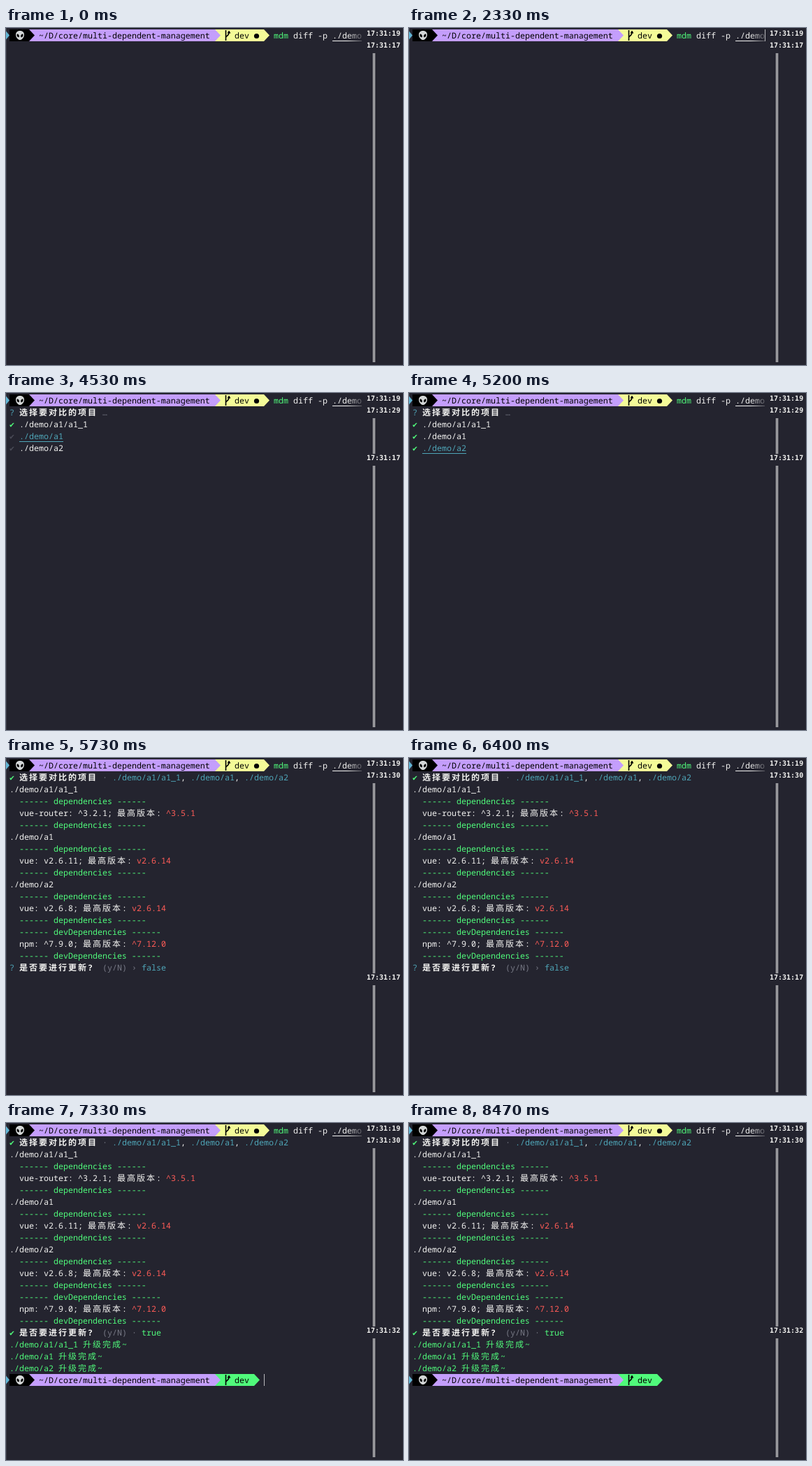
Write an HTML page that moves like this. It is 568x482 px and loops after 8540 ms.

```html
<!DOCTYPE html>
<html lang="zh-CN">
<head>
<meta charset="utf-8">
<style>
  html, body { margin: 0; width: 100%; height: 100%; overflow: hidden; background: #24242f; }
  svg { display: block; }
  text {
    font: 11.6667px "Noto Sans Mono", "DejaVu Sans Mono", monospace;
    white-space: pre;
    text-rendering: geometricPrecision;
  }
  .wide { font: 12px "Noto Sans CJK SC", "Noto Sans CJK", sans-serif; letter-spacing: 2px; }
  .bold { font-weight: 700; }
  .stamp { font: 700 10px "DejaVu Sans Mono", monospace; }
</style>
</head>
<body>
<svg width="568" height="482" viewBox="0 0 568 482">
  <defs>
    <linearGradient id="fade">
      <stop offset="0" stop-color="#24242f" stop-opacity="0"/>
      <stop offset="1" stop-color="#24242f" stop-opacity=".75"/>
    </linearGradient>
  </defs>
  <g id="terminal"></g>
</svg>
<script>
(() => {
  const LOOP = 8540;
  const CELL = 7, LINE = 17, LEFT = 5;
  const C = {
    bg: '#24242f', white: '#f3f3f1', green: '#50fa7b', cyan: '#4fa6b8', red: '#ff5c57',
    grey: '#777985', dim: '#4b4c58', purple: '#c49efc', yellow: '#f4fb98', black: '#000'
  };
  // Moments of the session, in ms
  const AT = {
    enter: 2600, menu: 3330, checks: [4330, 4670, 4930], moves: [4530, 4800],
    submit: 5270, report: 5530, confirm: 6600, prompt: 7130
  };
  const PROJECTS = ['./demo/a1/a1_1', './demo/a1', './demo/a2'];
  const terminal = document.getElementById('terminal');

  const rowY = row => 2 + LINE * row;
  const colX = col => LEFT + CELL * col;
  const rect = (x, y, w, h, fill) => `<rect x="${x}" y="${y}" width="${w}" height="${h}" fill="${fill}"/>`;
  const path = (d, fill, extra = '') => `<path d="${d}" fill="${fill}" ${extra}/>`;

  // Places runs of [text, colour, style] on the character grid; CJK takes two cells
  function line(row, runs, col = 0) {
    let out = '';
    for (const [text, fill = C.white, style = ''] of runs) {
      const start = col;
      for (const part of text.match(/[\u2e80-\uffef]+|[^\u2e80-\uffef]+/g)) {
        const wide = part.charCodeAt(0) >= 0x2e80;
        const cls = (wide ? 'wide ' : '') + (style === 'bold' ? 'bold' : '');
        out += `<text x="${colX(col)}" y="${rowY(row) + 13}" fill="${fill}" class="${cls}">${part}</text>`;
        col += part.length * (wide ? 2 : 1);
      }
      if (style === 'under') out += rect(colX(start), rowY(row) + 16, CELL * (col - start), 1, fill);
    }
    return out;
  }

  function segment(from, to, row, fill) {
    const x0 = colX(from), x1 = colX(to), y = rowY(row);
    return path(`M${x0} ${y}H${x1}l8 8.5l-8 8.5H${x0}z`, fill);
  }

  function alien(x, y) {
    const eye = side => `<ellipse cx="${x + 2.8 * side}" cy="${y + .4}" rx="1.5" ry="2.5"
      transform="rotate(${30 * side} ${x + 2.8 * side} ${y + .4})"/>`;
    return path(`M${x} ${y - 6.5}c4.2 0 6 2.7 6 5.7c0 3.6-3.3 7.3-6 7.3s-6-3.7-6-7.3c0-3 1.8-5.7 6-5.7z`, '#d3d6d6')
      + eye(-1) + eye(1);
  }

  function branch(x, y) {
    return path(`M${x + 1.5} ${y + 1}V${y + 16}M${x + 1.5} ${y + 11.5}C${x + 1.5} ${y + 9} ${x + 6} ${y + 10} ${x + 6} ${y + 4}`,
      'none', 'stroke="#000" stroke-width="1.6"')
      + path(`M${x + 3.5} ${y + 5.5}l2.5-4l2.5 4z`, C.black);
  }

  function promptBar(row, dirty) {
    const y = rowY(row);
    return path(`M0 ${y + 2.5}L5 ${y + 8.5}L0 ${y + 14.5}z`, '#62b5d4')
      + segment(42, dirty ? 52 : 50, row, dirty ? C.yellow : C.green)
      + segment(4, 42, row, C.purple)
      + segment(0, 4, row, C.black)
      + alien(20, y + 8.5)
      + line(row, [['~/D/core/multi-dependent-management', C.black]], 6)
      + branch(colX(44), y)
      + line(row, [['dev', C.black]], 46)
      + (dirty ? `<circle cx="358.5" cy="${y + 9.5}" r="3.6"/>` : '');
  }

  function command() {
    return promptBar(0, true)
      + line(0, [['mdm', C.green], [' diff -p '], ['./demo', C.white, 'under']], 54)
      + rect(488, 2, 21, 17, 'url(#fade)');
  }

  // Clock column: [row, seconds] pairs joined by double rules
  function clock(stamps) {
    return stamps.map(([row, sec], i) => {
      const next = stamps[i + 1];
      const from = rowY(row) + 17, to = next ? rowY(next[0]) : 478;
      const rule = x => rect(x, from, 1, to - from, C.white);
      return `<text class="stamp" x="516" y="${rowY(row) + 9}" fill="${C.white}">17:31:${sec}</text>`
        + (row ? rule(525) + rule(527) : '');
    }).join('');
  }

  function menu(active, checked) {
    return line(1, [['?', C.cyan], [' '], ['选择要对比的项目', C.white, 'bold'], [' …', C.grey]])
      + PROJECTS.map((name, i) => line(2 + i, [
        ['✔', i < checked ? C.green : C.dim], [' '],
        i === active ? [name, C.cyan, 'under'] : [name]
      ])).join('');
  }

  function answer() {
    const [a, b, c] = PROJECTS;
    return line(1, [['✔', C.green], [' '], ['选择要对比的项目', C.white, 'bold'], [' · ', C.grey],
      [a, C.cyan], [', '], [b, C.cyan], [', '], [c, C.cyan]]);
  }

  function report() {
    const rule = (row, name) => line(row, [[`------ ${name} ------`, C.green]], 2);
    const block = (row, name, now, best) => rule(row, name)
      + line(row + 1, [[`${now}; 最高版本: `], [best, C.red]], 2) + rule(row + 2, name);
    return [2, 6, 10].map((row, i) => line(row, [[PROJECTS[i]]])).join('')
      + block(3, 'dependencies', 'vue-router: ^3.2.1', '^3.5.1')
      + block(7, 'dependencies', 'vue: v2.6.11', 'v2.6.14')
      + block(11, 'dependencies', 'vue: v2.6.8', 'v2.6.14')
      + block(14, 'devDependencies', 'npm: ^7.9.0', '^7.12.0');
  }

  function question(done) {
    return line(17, [done ? ['✔', C.green] : ['?', C.cyan], [' '], ['是否要进行更新? ', C.white, 'bold'],
      [done ? ' (y/N) · ' : ' (y/N) › ', C.grey], done ? ['true', C.green] : ['false', C.cyan]]);
  }

  function upgrades() {
    return PROJECTS.map((name, i) => line(18 + i, [[`${name} 升级完成~`, C.green]])).join('');
  }

  const within = (t, from, to) => t >= from && t < to;

  function cursor(t) {
    const bar = (x, row) => rect(x, rowY(row), 1, LINE, '#b9b9bd');
    if (within(t, 270, 800) || within(t, 1330, 1870) || within(t, 2330, AT.enter)) return bar(509, 0);
    if (within(t, AT.enter, AT.menu)) return bar(LEFT, 1);
    if (within(t, AT.submit, AT.report)) return bar(LEFT, 2);
    if (within(t, AT.confirm, AT.prompt)) return bar(LEFT, 21);
    if (within(t, AT.prompt, 7930)) return bar(colX(52), 21);
    return '';
  }

  function stamps(t) {
    if (t < AT.menu) return [[0, 19], [1, 17]];
    if (t < AT.report) return [[0, 19], [1, t < AT.checks[0] ? 28 : t < AT.submit ? 29 : 30], [5, 17]];
    if (t < AT.confirm) return [[0, 19], [1, 30], [18, 17]];
    const rows = [[0, 19], [1, 30], [17, 32]];
    return t < AT.prompt ? [...rows, [22, 17]] : rows;
  }

  function draw(t) {
    const passed = times => times.filter(x => t >= x).length;
    let out = rect(0, 0, 568, 482, C.bg) + rect(0, 0, 1, 482, '#3a3b46') + command();
    if (within(t, AT.menu, AT.submit)) out += menu(passed(AT.moves), passed(AT.checks));
    if (t >= AT.submit) out += answer();
    if (t >= AT.report) out += report() + question(t >= AT.confirm);
    if (t >= AT.confirm) out += upgrades();
    if (t >= AT.prompt) out += promptBar(21, false);
    return out + cursor(t) + clock(stamps(t));
  }

  let shown = '';
  function tick() {
    const picture = draw(performance.now() % LOOP);
    if (picture !== shown) terminal.innerHTML = shown = picture;
    requestAnimationFrame(tick);
  }
  tick();
})();
</script>
</body>
</html>
```
